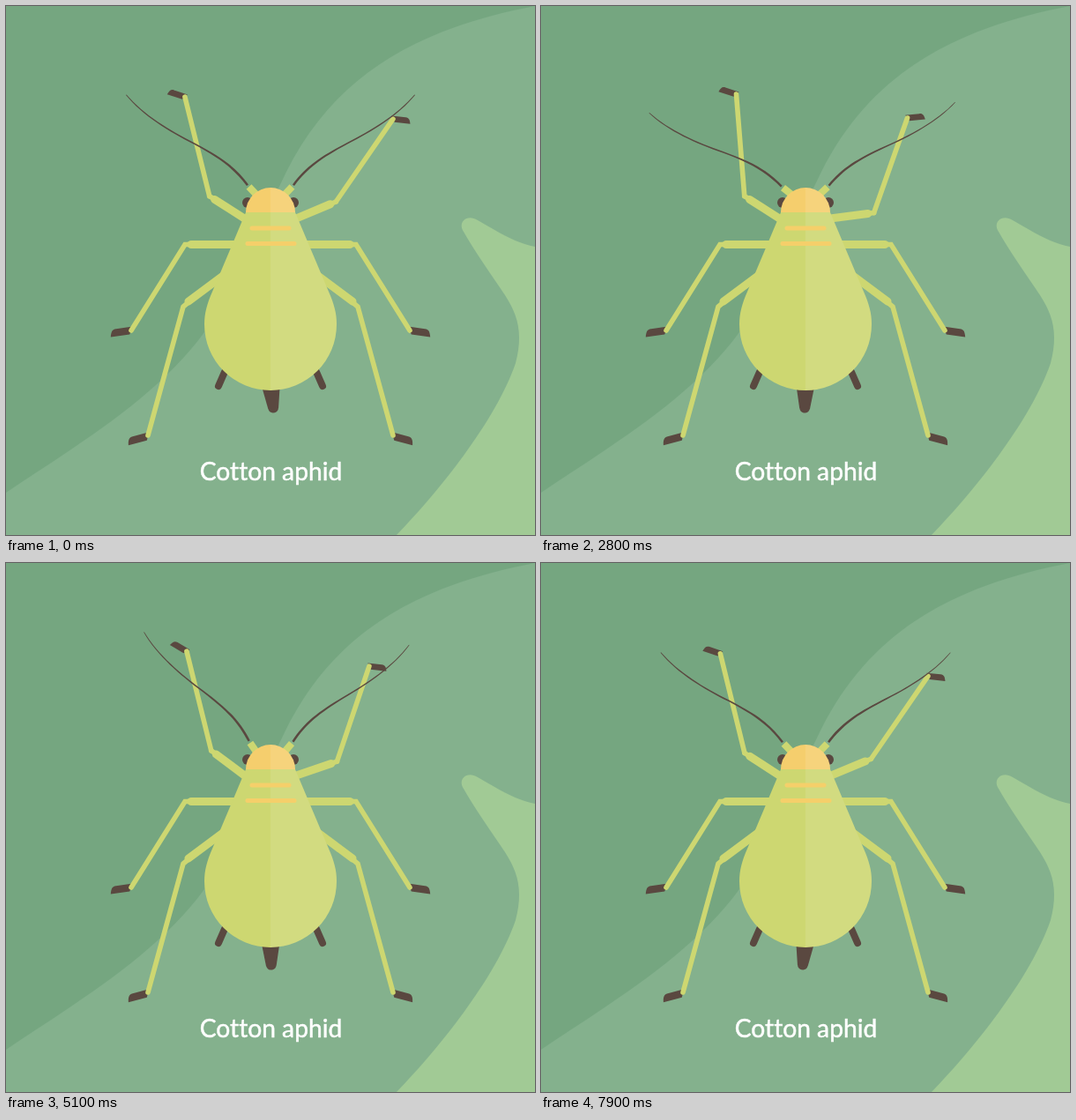
An HTML page that plays this animation: 600x600 px, repeating every 8000 ms.

```html
<!DOCTYPE html>
<html lang="en">
<head>
<meta charset="utf-8">
<title>Cotton aphid</title>
<style>
  html, body { margin: 0; width: 100%; height: 100%; overflow: hidden; background: #75a680; }
  svg { display: block; width: 100vw; height: 100vh; }
  .limb { stroke: #cdd771; stroke-linecap: round; fill: none; }
  .thigh { stroke-width: 9; }
  .shin { stroke-width: 5.6; }
  .dark { fill: #5a4840; }
  .stripe { stroke: #f5cf6a; stroke-width: 5; stroke-linecap: round; }
  text {
    font: 400 28.2px Lato, "Open Sans", sans-serif; font-variant-ligatures: none;
    fill: #fff; stroke: #fff; stroke-width: .5; text-anchor: middle;
  }
</style>
</head>
<body>
<svg viewBox="0 0 600 600">
  <defs>
    <path id="foot" class="dark" d="M2-3.5H-14C-18-3.5-19-1-20 3.5H-2Z"/>
    <g id="side">
      <path d="M248 415L241 431" stroke="#5a4840" stroke-width="8" stroke-linecap="round"/>
      <use href="#foot" transform="translate(142 368) rotate(-8) scale(1.2)"/>
      <path class="limb thigh" d="M264 270.5H210"/>
      <path class="limb shin" d="M210 270.5H203L142 368"/>
      <use href="#foot" transform="translate(161 488) rotate(-15) scale(1.2)"/>
      <path class="limb thigh" d="M250 303L207 335"/>
      <path class="limb shin" d="M207 336L201 341L161 487"/>
    </g>
    <g id="feeler">
      <path class="dark" d="M273 204C258 184 243 173 213 156.8C185 142.5 155 124.5 136 101L136.6 100.6C156 123.5 186 141.5 213.6 155.2C244 171 260 182 275 202.5Z"/>
      <path d="M285 215L275.5 205" stroke="#cdd771" stroke-width="8"/>
    </g>
    <path id="trunk" d="M272 234H328L366 324C372 338 375 348 375 361A75 75 0 0 1 225 361C225 348 228 338 234 324Z"/>
    <path id="head" d="M272 234A28 28 0 0 1 328 234Z"/>
    <clipPath id="shape"><use href="#trunk"/><use href="#head"/></clipPath>
  </defs>

  <rect width="600" height="600" fill="#75a680"/>
  <path fill="#84b18d" d="M600 0C470 25 375 75 318 188C285 255 268 310 225 370C170 445 85 495 0 552V600H600Z"/>
  <path fill="#a1ca95" d="M600 273C578 269 556 255 535 243C522 235 512 246 519 256C530 276 550 304 566 328C580 350 587 370 578 405C557 467 496 545 443 600H600Z"/>

  <path id="tail" class="dark" d="M289.5 430H310.5L306 456Q305 461 301 461.5H299Q295 461 294 456Z"/>
  <use href="#side"/>
  <g id="left"></g>
  <g transform="matrix(-1 0 0 1 600 0)">
    <use href="#side"/>
    <g id="right"></g>
    <use id="feelerR" href="#feeler"/>
    <circle class="dark" cx="274" cy="223" r="6"/>
  </g>
  <use id="feelerL" href="#feeler"/>
  <circle class="dark" cx="274" cy="223" r="6"/>

  <use href="#trunk" fill="#cdd771"/>
  <use href="#head" fill="#f5ce6d"/>
  <rect x="300" y="200" width="80" height="240" fill="#fff" opacity=".1" clip-path="url(#shape)"/>
  <path class="stripe" d="M279 252H321M274 269.5H327"/>
  <text x="300.5" y="538">Cotton aphid</text>
</svg>
<script>
const LOOP = 8000, STEP = 100, REST = 37;
const $ = id => document.getElementById(id);
const wave = turns => Math.cos(2 * Math.PI * turns);
const ease = u => (1 - wave(u / 2)) / 2;
const mix = (a, b, u) => a + (b - a) * u;

// Smooth bump from 0 up to 1 at mid and back to 0
const pulse = (t, mid, half) => ease(Math.max(0, 1 - Math.abs(t - mid) / half));

// A feeler dips, sweeps up, lingers, dips again and rests, every 4 s
function lift(t, lag) {
  const turns = [[0, REST], [.55 + lag, 28], [1.3 + lag, 50], [2 + lag, 52], [3 + lag, 27], [4, REST]];
  const i = turns.findIndex(k => t < k[0]);
  const [t0, a] = turns[i - 1], [t1, b] = turns[i];
  return mix(a, b, ease((t - t0) / (t1 - t0)));
}

function frontLeg(id, thigh, shin) {
  const root = $(id);
  root.innerHTML = `
    <path class="limb thigh" d="M0 0H${7 - thigh}"/><path class="limb shin" d="M${7 - thigh} 0H${-thigh}"/>
    <g><g><use href="#foot"/></g><path class="limb shin" d="M0 0V${-shin}"/></g>`;
  const lower = root.querySelector("g"), foot = lower.querySelector("g");
  // Hip and toe are raised from level, the shin leans out from upright
  return (hip, lean, toe) => {
    root.setAttribute("transform", `translate(270 240.7) rotate(${hip})`);
    lower.setAttribute("transform", `translate(${-thigh} 0) rotate(${-hip - lean})`);
    foot.setAttribute("transform", `translate(0 ${-shin}) rotate(${lean + toe})`);
  };
}
const legL = frontLeg("left", 46.5, 116);
const legR = frontLeg("right", 48, 114);

function turn(id, deg, x, y) {
  $(id).setAttribute("transform", `rotate(${deg} ${x} ${y})`);
}

function draw(ms) {
  const t = Math.floor(ms % LOOP / STEP) * STEP / 1000;
  const raise = pulse(t, 6.2, 1.9);
  const upright = Math.min(1, 2 * pulse(t, 2.3, 2.3));

  legL(32.5 + 11.5 * raise,
       13.9 - 9.3 * upright - 13.9 * pulse(t, 6.6, 1.4),
       18 + 14 * pulse(t, 4.2, 1.5) + 20 * raise);
  legR(22.9 - 15.5 * pulse(t, 2.8, 1.2) - 10.6 * raise,
       23.4 + 9.5 * wave(t / 8) + 1.7 * wave(3 * t / 8),
       -6 + 26 * pulse(t, 3.6, 1.5));

  turn("feelerL", lift(t % 4, 0) - REST, 283, 213);
  turn("feelerR", lift(t % 4, .15) - REST, 283, 213);
  turn("tail", -6.4 * wave(t / 1.2 - .04), 300, 427);
}

const start = performance.now();
function tick() {
  draw(performance.now() - start);
  requestAnimationFrame(tick);
}
tick();
</script>
</body>
</html>
```
